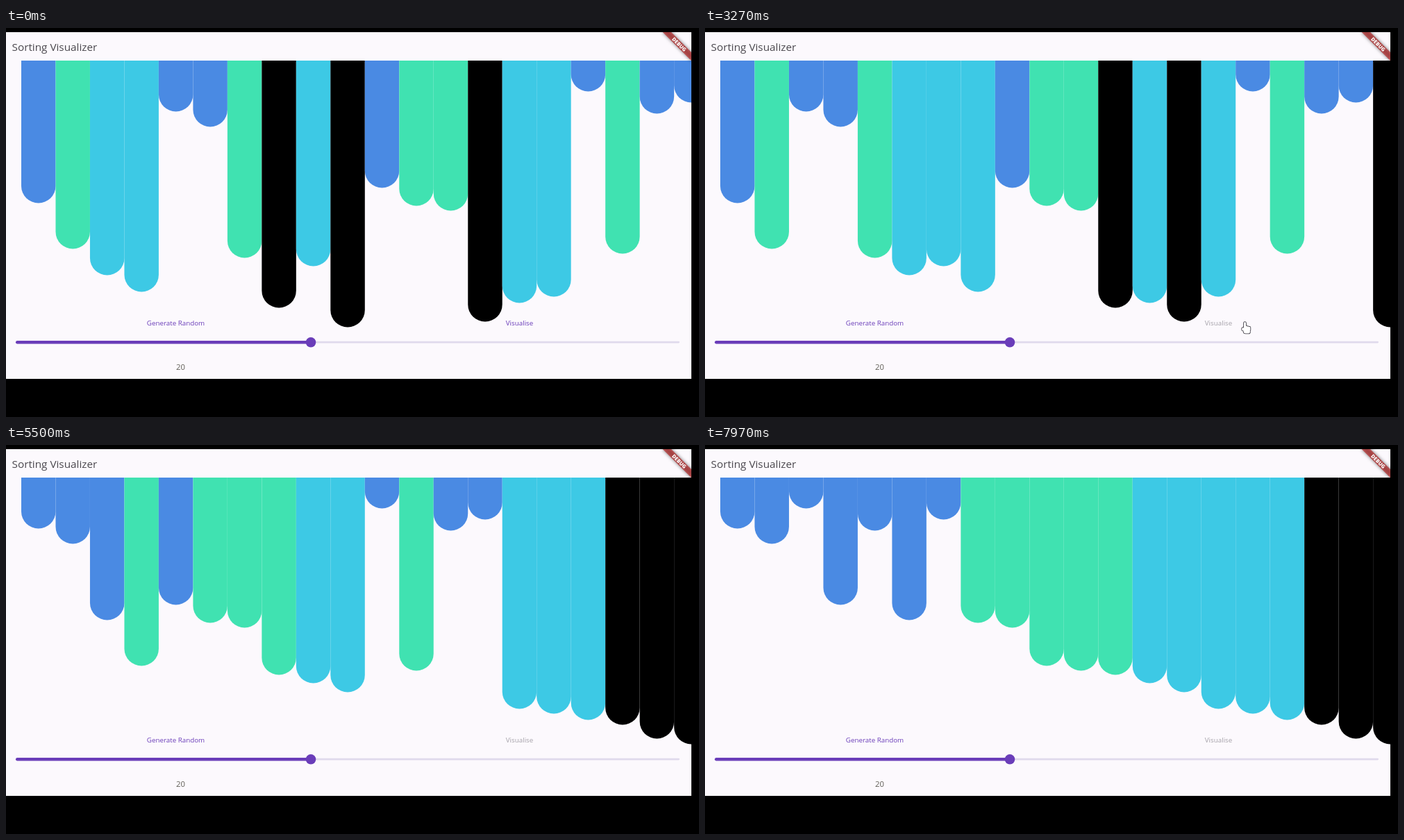
An HTML page with a canvas for the animation above (8000 ms loop, 998 by 561 pixels).

```html
<!DOCTYPE html>
<html lang="en">
<head>
<meta charset="utf-8">
<title>Sorting Visualizer</title>
<style>
  html, body { margin: 0; width: 100%; height: 100%; overflow: hidden; background: #000; }
  canvas { display: block; }
</style>
</head>
<body>
<canvas id="stage" width="998" height="561"></canvas>
<script>
const ctx = document.getElementById('stage').getContext('2d');
const LOOP = 8000;
const APP = { y: 6, w: 987, h: 500 };
const BAR = { x: 22, top: 47, pitch: 49.48 };
const PURPLE = '#6a3db9';
const FONT = '"Open Sans", "Noto Sans", sans-serif';

// The unsorted values, one per bar
const VALUES = [205, 271, 309, 333, 73, 95, 284, 356, 296, 384,
                183, 209, 216, 376, 349, 340, 44, 278, 76, 60];

const CLICK = 2230, SORT = 2250;

const ramp = (t, from, to) => Math.min(1, Math.max(0, (t - from) / (to - from)));
const ease = (t, from, to) => {
  const k = ramp(t, from, to);
  return k * k * (3 - 2 * k);
};

// Comparisons made so far: a brisk start, a slower middle, then a steady pace
const comparisons = t => Math.floor(
  76.5 * ramp(t, SORT, 4670) + 47 * ramp(t, 4670, 6300) + 51 * ramp(t, 6300, 7970));

// Bubble sort stopped after a number of comparisons
function bubble(steps) {
  const list = VALUES.slice();
  for (let end = list.length - 1; end > 0; end--) {
    for (let j = 0; j < end; j++) {
      if (steps-- <= 0) return list;
      if (list[j] > list[j + 1]) [list[j], list[j + 1]] = [list[j + 1], list[j]];
    }
  }
  return list;
}

// Each colour covers a band of values
function barColor(value) {
  if (value > 350) return '#000';
  if (value > 290) return '#3dc9e5';
  return value > 207 ? '#40e2b1' : '#4a8ae3';
}

function pill(x, y, w, h, r, color) {
  ctx.fillStyle = color;
  ctx.beginPath();
  ctx.roundRect(x, y, w, h, r);
  ctx.fill();
}

function label(text, x, y, font, color, align = 'center') {
  ctx.font = `${font} ${FONT}`;
  ctx.fillStyle = color;
  ctx.textAlign = align;
  ctx.fillText(text, x, y);
}

function drawBars(t) {
  const r = BAR.pitch / 2;
  bubble(comparisons(t)).forEach((value, i) => {
    pill(BAR.x + i * BAR.pitch, BAR.top, BAR.pitch, value + 0.4, [0, 0, r, r], barColor(value));
  });
}

function drawButtons(t) {
  const hover = ramp(t, 1080, 1200) - ramp(t, CLICK, CLICK + 150);
  const off = ramp(t, CLICK, CLICK + 200);
  const font = '500 9.8px';
  pill(491, 412, 496, 24, 12, `rgba(103, 58, 183, ${0.09 * hover})`);
  label('Generate Random', 244.5, 428.7, font, PURPLE);
  ctx.globalAlpha = 1 - off;
  label('Visualise', 739.5, 428.7, font, PURPLE);
  ctx.globalAlpha = off;
  label('Visualise', 739.5, 428.7, font, '#a6a2aa');
  ctx.globalAlpha = 1;
}

function drawSlider() {
  pill(439, 451.8, 531, 2.6, 1.3, '#e0daec');
  pill(14, 451, 425, 4.4, 2.2, PURPLE);
  pill(431.7, 446, 14.6, 14.6, 7.3, PURPLE);
  label(VALUES.length, 251.5, 493.4, '400 11.3px', '#605e56');
}

function drawBanner() {
  const s = 0.73, y = 28 * s, w = 80 * s, h = 12 * s;
  ctx.save();
  ctx.translate(APP.w, APP.y);
  ctx.rotate(Math.PI / 4);
  ctx.filter = 'blur(2.8px)';
  ctx.fillStyle = 'rgba(0, 0, 0, 0.5)';
  ctx.fillRect(-w / 2, y, w, h);
  ctx.filter = 'none';
  ctx.fillStyle = 'rgba(183, 28, 28, 0.63)';
  ctx.fillRect(-w / 2, y, w, h);
  label('DEBUG', 0, y + h / 2 + 2.7, '800 7.4px', '#fff');
  ctx.restore();
}

// A pointing finger, a thumb, three knuckles and a palm
function handShape() {
  const p = new Path2D();
  p.roundRect(-1.5, 0, 3, 12, 1.5);
  p.roundRect(-4.3, 8, 3.4, 4.5, 1.5);
  for (let i = 0; i < 3; i++) p.roundRect(1.2 + 2.2 * i, 5.6 + 0.6 * i, 2.3, 6, 1.1);
  p.roundRect(-2, 9, 9.4, 7.4, [0, 1, 2, 3]);
  return p;
}
const HAND = handShape();
const ARROW = new Path2D('M0 0 V13 L3.4 10 H9 Z');

function drawPointer(t) {
  if (t < 820 || t > 4600) return;
  const enter = ease(t, 820, 1250), leave = ramp(t, 4380, 4600);
  const x = 992 - 147.5 * enter - 67 * ease(t, 1750, 2080);
  const y = 474 - 53.5 * enter + 3.5 * ease(t, 1750, 2080) + 86 * leave;
  const shape = y < 437 ? HAND : ARROW;
  ctx.save();
  ctx.translate(x, y);
  ctx.strokeStyle = '#33313a';
  ctx.lineWidth = 1.6;
  ctx.lineJoin = 'round';
  ctx.stroke(shape);
  ctx.fillStyle = '#fff';
  ctx.fill(shape);
  ctx.restore();
}

function draw(t) {
  ctx.fillStyle = '#000';
  ctx.fillRect(0, 0, 998, 561);
  ctx.save();
  ctx.beginPath();
  ctx.rect(0, APP.y, APP.w, APP.h);
  ctx.clip();
  ctx.fillStyle = '#fcf9fd';
  ctx.fillRect(0, APP.y, APP.w, APP.h);
  label('Sorting Visualizer', 8.5, 33, '400 15.3px', '#4a474d', 'left');
  drawBars(t);
  drawButtons(t);
  drawSlider();
  drawBanner();
  drawPointer(t);
  ctx.restore();
}

const begin = performance.now();
function tick() {
  draw((performance.now() - begin) % LOOP);
  requestAnimationFrame(tick);
}
tick();
</script>
</body>
</html>
```
